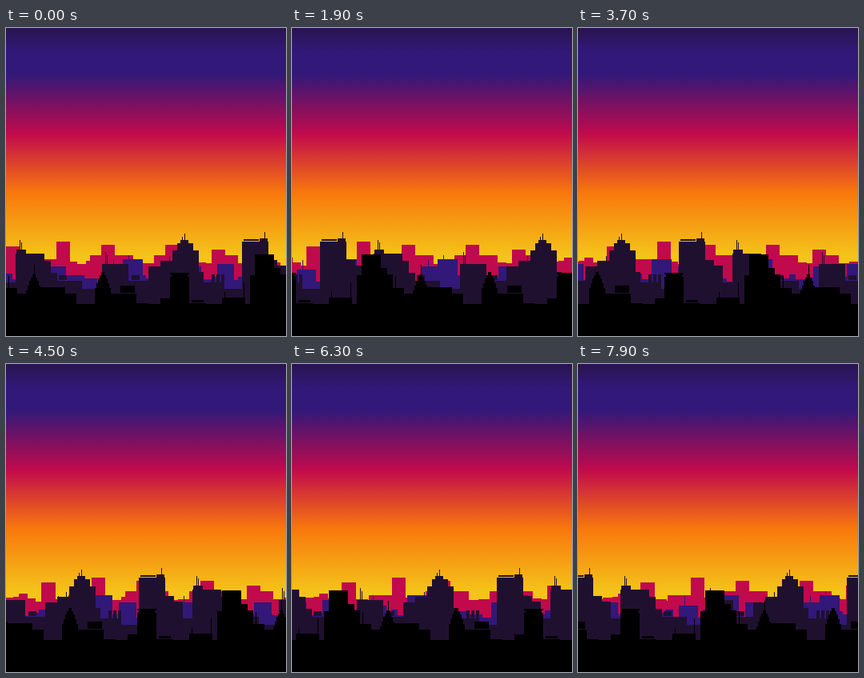
Recreate the animation shown at these times as an HTML page with a canvas. Size 350 by 385 pixels, loop 8000 ms.

```html
<!DOCTYPE html>
<html lang="en">
<head>
<meta charset="utf-8">
<title>City at dusk</title>
<style>
html, body { margin: 0; width: 100%; height: 100%; overflow: hidden; background: #000; }
canvas { display: block; width: 350px; height: 385px; image-rendering: pixelated; }
</style>
</head>
<body>
<canvas id="stage" width="350" height="385"></canvas>
<script>
const W = 350, H = 385, LOOP = 8000, STEP = 100;
const PACE = 351 / 350; // pixels per step for a layer of speed 1
const ctx = document.getElementById('stage').getContext('2d');

function random(seed) {
  return () => (seed = seed * 16807 % 2147483647) / 2147483647;
}

// Drawing tools for one skyline tile
function tools(g) {
  const block = (x, w, top) => g.fillRect(x, Math.round(top), w, H);
  const sign = (x, y, w, h) => g.fillRect(x, y, w, h);
  const spire = (x, top) => block(x, 1, top);

  // Low houses of random width and height
  function houses(seed, high, low) {
    const rnd = random(seed);
    for (let x = 0, w; x < W; x += w) {
      w = 8 + Math.floor(rnd() * 10);
      block(x, w, high + rnd() * (low - high));
    }
  }
  // Roofs going down in n equal steps
  function stairs(x, w, from, to, n) {
    for (let i = 0; i < n; i++) {
      block(x + Math.round(i * w / n), Math.ceil(w / n), from + (to - from) * i / (n - 1));
    }
  }
  function dome(cx, top, n) {
    for (let i = 0; i < n; i++) block(cx - 2 - 2 * i, 4 + 4 * i, top + 3 * i + i * i / 2);
  }
  function chimneys(x, gap, n, top) {
    for (let i = 0; i < n; i++) block(x + i * gap, 4, top);
  }
  return { block, sign, spire, houses, stairs, dome, chimneys };
}

function far({ block, houses }) {
  houses(7, 291, 297);
  block(0, 18, 273);
  block(34, 29, 289);
  block(63, 17, 267);
  for (const x of [119, 199]) {
    block(x - 14, 54, 284);
    block(x, 17, 271);
  }
  block(257, 17, 277);
  block(274, 16, 284);
  block(322, 11, 287);
}

function middle({ block, spire, houses }) {
  houses(23, 307, 319);
  for (const x of [20, 146]) block(x, 25, 289);
  for (const x of [53, 125, 222]) block(x, 22, 298);
  block(264, 21, 295);
  block(320, 24, 302);
  for (const x of [134, 327]) spire(x, 290);
  spire(153, 284);
}

function near({ block, sign, spire, stairs, chimneys }) {
  block(0, W, 326);
  block(0, 12, 318);

  // Twin-mast tower
  block(12, 36, 282);
  block(13, 12, 277);
  spire(17, 265);
  spire(19, 268);
  stairs(48, 15, 291, 306, 2);

  block(63, 32, 316);
  block(120, 33, 295);
  spire(124, 280);
  spire(126, 284);
  block(153, 25, 316);
  for (const x of [66, 157]) sign(x, 309, 10, 6);

  // Stepped tower
  stairs(178, 30, 298, 291, 2);
  spire(204, 285);
  block(208, 33, 278);
  block(214, 20, 269);
  block(218, 10, 265);
  spire(220, 261);
  spire(223, 257);

  block(241, 6, 305);
  block(247, 26, 318);
  chimneys(257, 6, 3, 308);

  // Crowned tower
  block(295, 33, 267);
  sign(297, 264, 19, 2);
  block(317, 10, 263);
  spire(323, 255);
  stairs(328, 22, 290, 297, 2);
}

function front({ block, sign, spire, stairs, dome, chimneys }) {
  block(0, W, 345);
  stairs(0, 28, 325, 332, 2);
  spire(3, 310);
  dome(35, 308, 5);
  spire(35, 296);
  block(43, 31, 324);
  stairs(74, 28, 332, 345, 2);

  dome(121, 305, 5);
  block(131, 32, 332);
  sign(143, 322, 18, 9);

  g_gap(block, stairs);
  block(205, 24, 311);
  sign(205, 306, 24, 2);
  sign(207, 308, 20, 3);
  sign(232, 340, 15, 3);
  chimneys(254, 6, 2, 347);

  block(270, 29, 337);
  spire(273, 330);
  spire(297, 318);

  // Tallest tower
  block(305, 6, 309);
  block(311, 24, 283);
  stairs(335, 15, 300, 308, 2);
}

function g_gap(block, stairs) {
  stairs(163, 30, 344, 350, 2);
  block(193, 12, 338);
  stairs(229, 41, 344, 352, 2);
}

function makeLayer(color, speed, paint) {
  const tile = document.createElement('canvas');
  tile.width = W;
  tile.height = H;
  const g = tile.getContext('2d');
  g.fillStyle = color;
  paint(tools(g));
  return { tile, speed };
}

const layers = [
  makeLayer('#c00a4c', 1, far),
  makeLayer('#321878', 2, middle),
  makeLayer('#20102f', 5, near),
  makeLayer('#000', 7, front)
];

// Sky: height and colour of each stop
const sky = ctx.createLinearGradient(0, 0, 0, H);
[
  [0, '#291450'], [30, '#321878'], [58, '#321878'],
  [132, '#c00a4c'], [206, '#f8780c'], [285, '#f4c41a']
].forEach(([y, color]) => sky.addColorStop(y / H, color));

function frame(now) {
  // The opening pose is held for two steps
  const step = Math.max(0, Math.floor(now % LOOP / STEP) - 1);
  ctx.fillStyle = sky;
  ctx.fillRect(0, 0, W, H);
  for (const { tile, speed } of layers) {
    const x = Math.round(step * speed * PACE) % W;
    ctx.drawImage(tile, x, 0);
    ctx.drawImage(tile, x - W, 0);
  }
  requestAnimationFrame(frame);
}

frame(performance.now());
</script>
</body>
</html>
```
